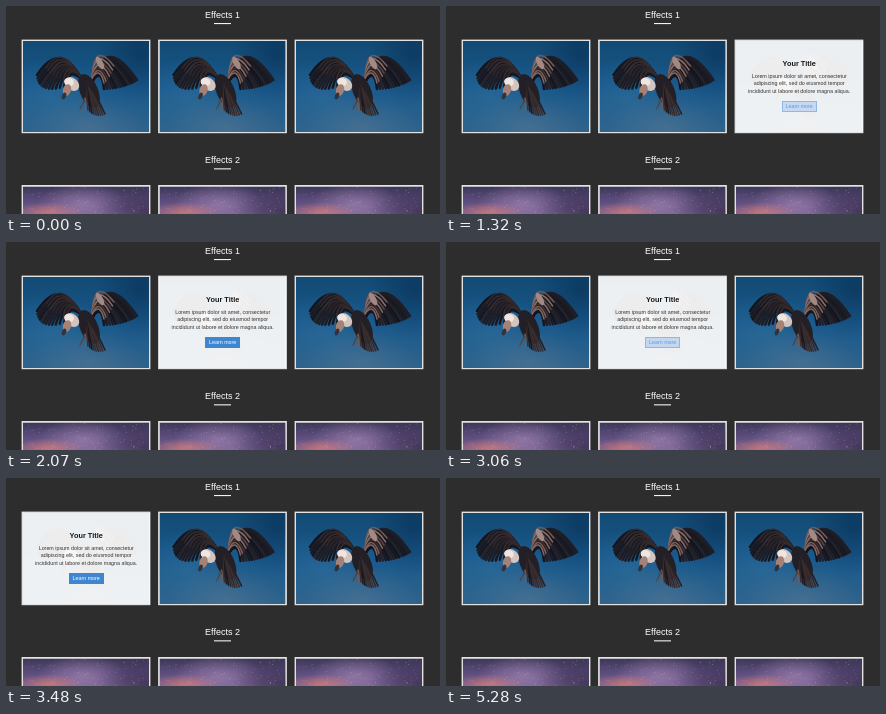
Animation, 434 px wide and 208 px high, one loop 5.58 s. Source, as an HTML page with a canvas:

```html
<!DOCTYPE html>
<html lang="en">
<head>
<meta charset="utf-8">
<title>Hover effects</title>
<style>
  html, body { margin: 0; width: 100%; height: 100%; overflow: hidden; background: #2d2d2d; }
  body { position: relative; font-family: "Liberation Sans", Arial, sans-serif; text-align: center; }
  canvas { position: absolute; left: 0; top: 0; width: 434px; height: 208px; }
  h2 { position: absolute; left: 0; width: 433px; margin: 0; font: 9px/12px "Liberation Sans", Arial, sans-serif; color: #fff; }
  .card { position: absolute; top: 35px; width: 127px; height: 91px; overflow: hidden; }
  .layer { position: absolute; left: 0; top: 0; width: 100%; height: 100%; overflow: hidden; background: rgba(250, 250, 250, .94); }
  .text { padding: 18px 7.5% 0; }
  h3 { margin: 0 -20px; font-size: 7.35px; line-height: 10px; color: #151515; }
  p { margin: 4px 0 6px; font-size: 5.35px; line-height: 7.3px; color: #333; }
  .btn { display: inline-block; box-sizing: border-box; height: 11px; padding: 0 2.7px; border: 1px solid #3f86d0;
         font-size: 5.35px; line-height: 9px; white-space: nowrap; vertical-align: top; }
</style>
</head>
<body>
<canvas id="stage"></canvas>
<h2 style="top:3px">Effects 1</h2>
<h2 style="top:148px">Effects 2</h2>
<script>
const LOOP = 5580, FADE = 300, PITCH = 136.5;
const BLUE = [63, 134, 208], PALE = [200, 218, 242], WHITE = [255, 255, 255];

// Hover intervals in ms and the way each card reveals its layer
const cards = [
  { on: 3175, off: 4972, btnOn: 3705, btnOff: 4965, reveal: fade },
  { on: 1773, off: 3150, btnOn: 2350, btnOff: 3045, reveal: slide },
  { on: 400, off: 1751, btnOn: 1065, btnOff: 1610, reveal: grow }
];

function fade(c, k) { c.layer.style.opacity = k; }
function slide(c, k) { c.layer.style.top = (1 - k) * 100 + '%'; }
function grow(c, k) {
  const s = c.layer.style;
  s.width = s.height = k * 100 + '%';
  s.left = s.top = (1 - k) * 50 + '%';
  c.text.style.paddingTop = 18 * k + 'px';
}

cards.forEach((c, i) => {
  const el = document.createElement('div');
  el.className = 'card';
  el.style.left = 16.7 + PITCH * i + 'px';
  el.innerHTML = `<div class="layer"><div class="text"><h3>Your Title</h3>
    <p>Lorem ipsum dolor sit amet, consectetur adipiscing elit, sed do eiusmod tempor incididunt ut labore et dolore magna aliqua.</p>
    <span class="btn">Learn more</span></div></div>`;
  document.body.append(el);
  c.layer = el.querySelector('.layer');
  c.text = el.querySelector('.text');
  c.btn = el.querySelector('.btn');
});

// CSS "ease": cubic-bezier(.25, .1, .25, 1)
function ease(x) {
  if (x <= 0) return 0;
  if (x >= 1) return 1;
  const bez = (u, a, b) => 3 * a * u * (1 - u) ** 2 + 3 * b * u * u * (1 - u) + u ** 3;
  let lo = 0, hi = 1;
  for (let i = 0; i < 22; i++) {
    const mid = (lo + hi) / 2;
    if (bez(mid, .25, .25) < x) lo = mid; else hi = mid;
  }
  return bez(lo, .1, 1);
}

const hover = (t, on, off) => ease((t - on) / FADE) - ease((t - off) / FADE);
const mix = (a, b, k) => `rgb(${a.map((v, i) => Math.round(v + (b[i] - v) * k))})`;

function frame() {
  const t = performance.now() % LOOP;
  for (const c of cards) {
    const k = hover(t, c.on, c.off), b = hover(t, c.btnOn, c.btnOff), s = c.btn.style;
    c.layer.style.visibility = k > .001 ? 'visible' : 'hidden';
    c.reveal(c, k);
    s.backgroundColor = mix(BLUE, PALE, b);
    s.borderColor = mix(BLUE, PALE, b * .6);
    s.color = mix(WHITE, BLUE, b * .85);
  }
  requestAnimationFrame(frame);
}

const canvas = document.getElementById('stage'), g = canvas.getContext('2d');
const dpr = window.devicePixelRatio || 1;
canvas.width = 434 * dpr;
canvas.height = 208 * dpr;
g.scale(dpr, dpr);

let seed;
const rnd = () => (seed = seed * 16807 % 2147483647) / 2147483647;

function rect(x, y, w, h, fill) {
  g.fillStyle = fill;
  g.fillRect(x, y, w, h);
}

function ellipse(x, y, rx, ry, turn, fill) {
  g.fillStyle = fill;
  g.beginPath();
  g.ellipse(x, y, rx, ry, turn, 0, 7);
  g.fill();
}

function shade(x0, y0, x1, y1, ...colors) {
  const grad = g.createLinearGradient(x0, y0, x1, y1);
  colors.forEach((c, i) => grad.addColorStop(i / (colors.length - 1), c));
  return grad;
}

function glow(x, y, rx, ry, rgb, alpha) {
  g.save();
  g.translate(x, y);
  g.scale(rx, ry);
  const grad = g.createRadialGradient(0, 0, 0, 0, 0, 1);
  grad.addColorStop(0, `rgba(${rgb},${alpha})`);
  grad.addColorStop(1, `rgba(${rgb},0)`);
  ellipse(0, 0, 1, 1, 0, grad);
  g.restore();
}

function clipped(x, y, w, h, draw) {
  g.save();
  g.beginPath();
  g.rect(x, y, w, h);
  g.clip();
  draw();
  g.restore();
}

const lerp = (a, b, u) => a.map((v, i) => v + (b[i] - v) * u);
const curve = (a, b, c, u) => lerp(lerp(a, b, u), lerp(b, c, u), u);

// Feathers bend from the shoulder over a moving wrist to tips along a curve
function wing(shoulder, wrists, tips, n, width, from, to) {
  g.lineCap = 'round';
  for (let i = 0; i < n; i++) {
    const u = i / (n - 1);
    g.strokeStyle = mix(from, to, rnd());
    g.lineWidth = width;
    g.beginPath();
    g.moveTo(...shoulder);
    g.quadraticCurveTo(...lerp(...wrists, u), ...curve(...tips, u));
    g.stroke();
  }
}

function bird() {
  const black = [18, 20, 30], soot = [42, 36, 42], brown = [62, 48, 47], tan = [148, 116, 108];
  seed = 11;
  wing([75, 72], [[54, 34], [60, 62]], [[31, 69], [33, 90], [63, 79]], 13, 2.5, black, soot);
  wing([74, 70], [[55, 37], [62, 60]], [[40, 62], [46, 72], [62, 73]], 8, 1.3, soot, brown);
  wing([87, 74], [[100, 28], [96, 62]], [[131, 74], [118, 82], [98, 83]], 14, 2.6, black, soot);
  wing([86, 72], [[88, 34], [94, 60]], [[108, 60], [104, 72], [98, 77]], 7, 1.5, brown, tan);
  ellipse(94, 57, 3, 7, -.5, mix(tan, WHITE, .15));
  ellipse(83, 85, 9, 18, -.4, mix(black, soot, .7));
  wing([82, 78], [[80, 92], [92, 92]], [[82, 104], [90, 112], [99, 108]], 9, 1.6, black, brown);
  wing([79, 92], [[77, 98], [81, 98]], [[74, 103], [77, 105], [79, 105]], 2, 1.2, brown, tan);
  ellipse(66, 78, 8, 6, .7, '#d3c4be');
  ellipse(63, 76, 5, 4, .3, '#efe6e1');
  ellipse(61, 84, 4, 6, .3, '#a58278');
  ellipse(58, 90, 2, 3.5, .4, '#33313a');
}

function photo() {
  rect(17, 35, 126, 91, shade(0, 35, 0, 126, '#124a73', '#19598c', '#2f638b'));
  glow(45, 92, 55, 40, '50,115,160', .45);
  glow(82, 122, 58, 34, '95,125,150', .45);
  glow(135, 48, 45, 50, '4,36,72', .45);
  bird();
}

function sky() {
  rect(17, 180.5, 126, 28, shade(0, 180, 0, 208, '#3b3655', '#5b4c7c', '#715c8e'));
  glow(76, 198, 45, 22, '172,140,185', .6);
  glow(42, 206, 36, 10, '235,130,115', .65);
  glow(140, 206, 50, 30, '48,38,66', .65);
  seed = 7;
  for (let i = 0; i < 150; i++) {
    rect(17 + rnd() * 125, 181 + rnd() * 27, .8, .8, `rgba(235,215,240,${rnd() * .45})`);
  }
}

rect(0, 0, 434, 208, '#2d2d2d');
for (const y of [17, 162.3]) rect(208, y, 17, 1.1, '#f2f2f2');
for (let i = 0; i < 3; i++) {
  g.save();
  g.translate(PITCH * i, 0);
  for (const y of [33.6, 179]) rect(15.6, y, 128.8, 93.6, '#e2e2e2');
  clipped(17, 35, 126, 91, photo);
  clipped(17, 180.5, 126, 28, sky);
  g.restore();
}
frame();
</script>
</body>
</html>
```
